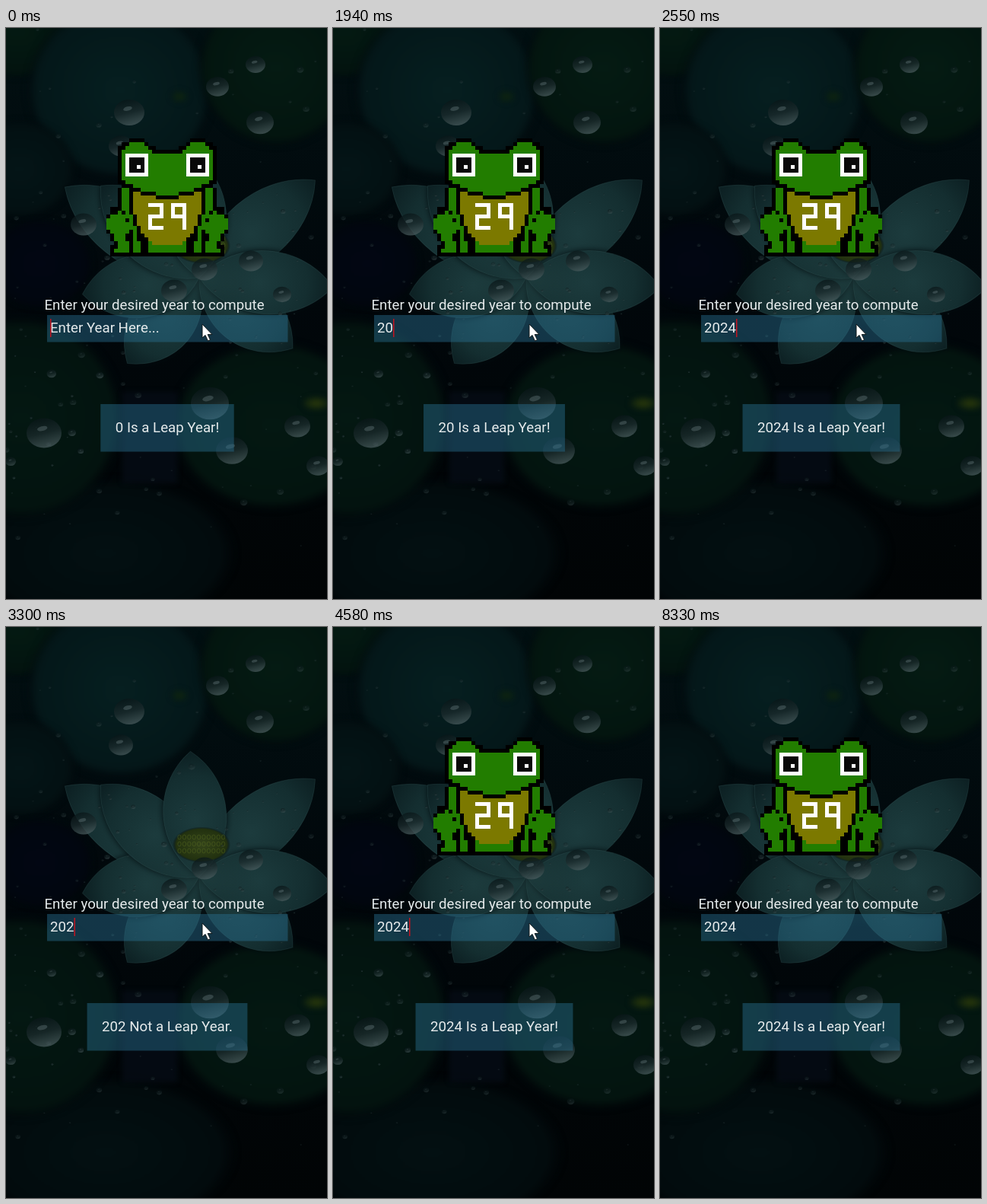
Recreate the animation shown at these times as an HTML page with a canvas. Size 422 px wide and 750 px high, loop 8.45 s.

```html
<!DOCTYPE html>
<html lang="en">
<head>
<meta charset="utf-8">
<title>Leap year checker</title>
<style>
  html, body { margin: 0; width: 100%; height: 100%; overflow: hidden; background: #010709; }
  canvas, svg { position: absolute; left: 0; top: 0; width: 422px; height: 750px; }
  text { font: 18.7px Roboto, sans-serif; fill: #e6ebec; }
  .box { fill: rgb(40, 112, 145); fill-opacity: .45; }
  .pixels { shape-rendering: crispEdges; }
</style>
</head>
<body>
<canvas id="pond" width="422" height="750"></canvas>
<svg viewBox="0 0 422 750">
  <defs>
    <g id="half">
      <path d="M16 3H13V2H11V1H10V0H6V1H4V2H3V12H4V13H3V18H1V20H0V25H1V27H2V28H1V31H16Z" fill="#000"/>
      <g fill="#227d00">
        <path d="M16 4H12V3H11V2H10V1H6V2H5V3H4V11H5V12H7V13H9V14H13V15H16Z"/>
        <path d="M4 13H6V20H7V23H8V27H9V30H7V24H6V21H5V19H4Z"/>
        <path d="M1 20H3V19H4V20H5V22H6V25H5V27H6V30H2V29H3V27H2V25H1V24H0V21H1Z"/>
        <path d="M11 27H12V28H16V30H11Z"/>
      </g>
      <path d="M16 16H13V15H9V14H7V20H8V23H9V25H10V26H11V27H12V28H16Z" fill="#7c7900"/>
      <path d="M5 4H11V10H5Z" fill="#fff"/>
      <path d="M6 5H10V9H6Z" fill="#080808"/>
    </g>
  </defs>

  <g id="frog" class="pixels" transform="translate(132 145) scale(5)">
    <use href="#half"/>
    <use href="#half" transform="matrix(-1 0 0 1 32 0)"/>
    <path d="M8 7h1v1h-1zM24 7h1v1h-1z
             M11 17h4v4h-3v2h3v1h-4v-4h3v-2h-3z
             M17 17h4v7h-1v-3h-3zM18 18v2h2v-2z" fill="#fff" fill-rule="evenodd"/>
  </g>

  <rect class="box" x="54" y="377" width="316.5" height="35.5"/>
  <text x="50.5" y="370">Enter your desired year to compute</text>
  <text id="entry" x="58" y="400"></text>
  <rect id="caret" y="382" width="1.5" height="24" fill="#c41420"/>

  <rect id="button" class="box" y="494" height="62.5"/>
  <text id="result" x="212" y="531" text-anchor="middle"></text>

  <path id="mouse" d="M0 0V18L4 14.5L7.5 22L10.5 20.5L7.2 13.6H13Z"
        fill="#fff" stroke="#10181a" stroke-width="1"/>
</svg>

<script>
const $ = id => document.getElementById(id);
const LOOP = 8450;

// ---------- pond ----------
const c = $('pond').getContext('2d');
let seed = 29;
const rnd = () => (seed = (seed * 16807) % 2147483647) / 2147483647;

function pad(x, y, r, squash, color, edge) {
  c.save();
  c.translate(x, y);
  c.scale(r, r * squash);
  const g = c.createRadialGradient(0, 0, 0, 0, 0, 1);
  g.addColorStop(0, color);
  g.addColorStop(.88, edge);
  g.addColorStop(1, 'rgba(1,7,10,0)');
  c.fillStyle = g;
  c.fillRect(-1, -1, 2, 2);
  c.restore();
}

// A pointed leaf growing from the flower's heart, darker towards the rim.
function petal(degrees, len) {
  const w = 46;
  c.save();
  c.translate(254, 328);
  c.rotate(degrees * Math.PI / 180);
  c.beginPath();
  c.moveTo(0, 0);
  c.bezierCurveTo(len * .25, -w * 1.2, len * .75, -w * 1.2, len, 0);
  c.bezierCurveTo(len * .75, w * 1.2, len * .25, w * 1.2, 0, 0);
  const g = c.createRadialGradient(len * .45, 0, 0, len * .45, 0, len * .6);
  g.addColorStop(0, '#1c3b3d');
  g.addColorStop(.6, '#142e30');
  g.addColorStop(1, '#0a1b1e');
  c.shadowColor = '#000a0d';
  c.shadowBlur = 9;
  c.fillStyle = g;
  c.fill();
  c.shadowBlur = 0;
  c.strokeStyle = 'rgba(70,110,112,.22)';
  c.stroke();
  c.restore();
}

function drop(x, y, r, alpha) {
  c.save();
  c.globalAlpha = alpha;
  c.translate(x, y);
  c.scale(r, r * .85);
  c.beginPath();
  c.arc(0, 0, 1, 0, 7);
  const g = c.createLinearGradient(-.3, -1, .3, 1);
  g.addColorStop(0, '#081517');
  g.addColorStop(.5, '#1c2b2d');
  g.addColorStop(1, '#4c5e60');
  c.fillStyle = g;
  c.fill();
  c.beginPath();
  c.ellipse(-.1, -.3, .3, .16, -.3, 0, 7);
  c.fillStyle = 'rgba(130,150,152,.4)';
  c.fill();
  c.restore();
}

function scatter(n, x, y, w, h, size, alpha) {
  while (n--) drop(x + rnd() * w, y + rnd() * h, 1 + rnd() ** 2 * size, alpha);
}

function drawPond() {
  const g = c.createLinearGradient(0, 0, 0, 750);
  g.addColorStop(0, '#021012');
  g.addColorStop(.45, '#01070b');
  g.addColorStop(1, '#010405');
  c.fillStyle = g;
  c.fillRect(0, 0, 422, 750);

  c.filter = 'blur(3px)';
  pad(15, 5, 80, .78, '#041a12', '#03130f');
  pad(150, 82, 126, .95, '#061f20', '#041719');
  pad(355, 52, 106, 1, '#051b13', '#03150f');
  pad(18, 185, 75, .88, '#041517', '#031012');
  pad(45, 310, 70, .86, '#020613', '#01060f');
  pad(130, 690, 175, .58, '#031012', '#020b0d');
  pad(20, 512, 137, 1, '#041812', '#03130f');
  pad(350, 522, 136, .84, '#041812', '#03140f');
  pad(408, 493, 19, .5, '#2c3a0a', '#0d2010');
  pad(228, 90, 12, .7, '#10260d', '#061c18');
  c.fillStyle = 'rgba(6,13,24,.7)';
  c.fillRect(153, 478, 72, 120);
  c.filter = 'none';

  // [angle, length], back to front
  [[214, 213], [320, 199], [130, 147], [37, 154], [4, 176], [172, 155], [223, 177], [266, 165]]
    .forEach(p => petal(...p));
  pad(254, 330, 95, .8, 'rgba(46,84,84,.4)', 'rgba(30,60,60,0)');

  pad(257, 286, 38, .62, '#34441a', '#22310f');
  c.strokeStyle = 'rgba(95,115,35,.4)';
  for (let i = 0; i < 30; i++) {
    c.beginPath();
    c.ellipse(228 + i % 10 * 6.4, 276 + (i / 10 | 0) * 9, 2.2, 3, 0, 0, 7);
    c.stroke();
  }

  scatter(80, 0, 0, 422, 680, 4, .35);
  scatter(60, 120, 215, 270, 200, 3, .5);
  scatter(16, 0, 420, 130, 180, 8, .6);

  // The largest drops: x, y, radius
  [[162, 111, 20], [151, 155, 16], [334, 124, 18], [278, 77, 15], [328, 48, 13],
   [102, 258, 17], [322, 306, 16], [221, 345, 17], [261, 317, 17], [363, 350, 12],
   [50, 532, 23], [268, 493, 25], [297, 555, 21], [383, 523, 17], [410, 575, 15]]
    .forEach(([x, y, r]) => drop(x, y, r, .75));
}

// ---------- timeline ----------
const BLINK = 497;
const keys = [[-80, ''], [1670, '2'], [1940, '20'], [2300, '202'], [2520, '2024'],
  [3300, '202'], [3730, '2023'], [4210, '202'], [4580, '2024']];

const isLeap = y => y % 4 === 0 && (y % 100 !== 0 || y % 400 === 0);

// Eased progress from 0 to 1 between two times
function ease(t, from, to) {
  const p = Math.min(1, Math.max(0, (t - from) / (to - from)));
  return p * p * (3 - 2 * p);
}

function mouseAt(t) {
  const nudge = ease(t, 6020, 6120), aside = ease(t, 6380, 6610), leave = ease(t, 6780, 7060);
  return [258 + 10 * nudge + 35 * aside, 389 + 32 * nudge + 335 * leave];
}

let shown = null;
function showYear(value) {
  if (value === shown) return;
  shown = value;
  const year = Number(value), leap = isLeap(year);
  $('entry').textContent = value || 'Enter Year Here...';
  $('result').textContent = year + (leap ? ' Is a Leap Year!' : ' Not a Leap Year.');
  $('frog').style.display = leap ? '' : 'none';
  const w = $('result').getComputedTextLength() + 39;
  $('button').setAttribute('width', w);
  $('button').setAttribute('x', 212 - w / 2);
  $('caret').setAttribute('x', 58 + value.length * 10.5);
}

function frame() {
  const t = performance.now() % LOOP;
  const [pressed, value] = keys.findLast(k => k[0] <= t);
  showYear(value);
  $('caret').style.opacity = 1 - Math.floor((t - pressed) / BLINK) % 2;
  $('mouse').setAttribute('transform', `translate(${mouseAt(t)})`);
  requestAnimationFrame(frame);
}

drawPond();
frame();
</script>
</body>
</html>
```
